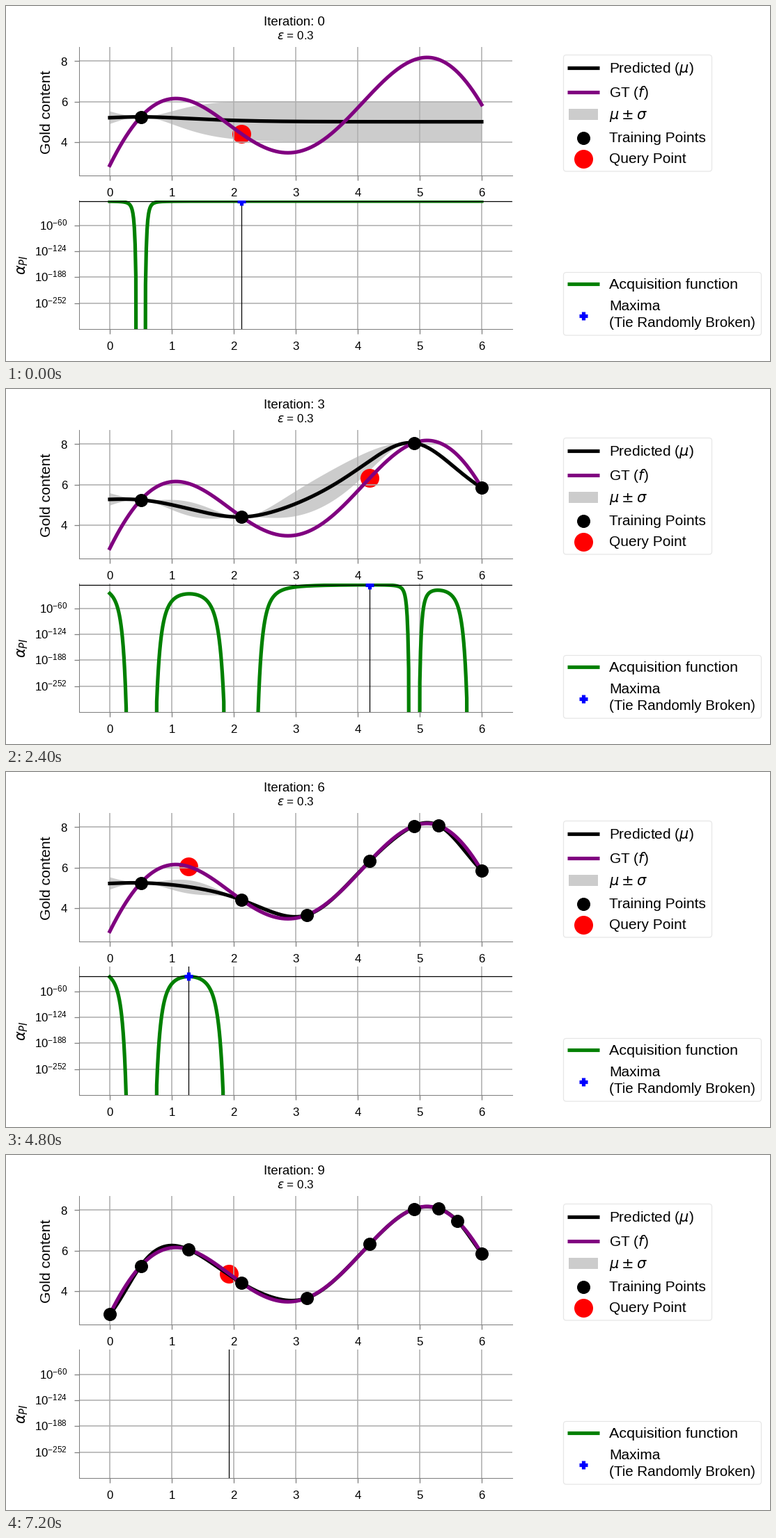
Write a matplotlib script that moves like this. It is 1097 px wide and 511 px high and loops after 8 s.

```python
import math

import numpy as np
import matplotlib.pyplot as plt
from matplotlib.animation import FuncAnimation
from matplotlib.patches import FancyBboxPatch, Rectangle

W, H, DPI = 1097, 511, 100
PX = 72 / DPI  # points per pixel
EPSILON = 0.3
PRIOR_MEAN = 5
UNDERFLOW = -1000  # log10 stand-in for a probability of zero

plt.rcParams.update({"font.family": "Liberation Sans", "mathtext.fontset": "dejavusans"})

grid = np.linspace(0, 6, 500)
query_x = grid[[177, 499, 408, 349, 264, 441, 106, 0, 466, 160]]
train_x = np.concatenate([[0.5], query_x])
erfc = np.vectorize(math.erfc)


def gold(x):
    u = x - 3
    return 2 * u * np.sin(u) + x / 2 + 2


def matern(a, b):
    d = math.sqrt(5) * np.abs(a[:, None] - b[None, :])
    return (1 + d + d**2 / 3) * np.exp(-d)


def predict(x):
    """Posterior mean and spread of the Gaussian process on the grid."""
    cross = matern(x, grid)
    weights = np.linalg.solve(matern(x, x) + 1e-10 * np.eye(len(x)), cross)
    mean = PRIOR_MEAN + (gold(x) - PRIOR_MEAN) @ weights
    spread = np.maximum(1 - np.sum(cross * weights, axis=0), 1e-10)
    return mean, spread


def log_improvement(mean, spread, best):
    z = (mean - best - EPSILON) / spread
    p = 0.5 * erfc(-z / math.sqrt(2))
    return np.where(p > 0, np.log10(np.maximum(p, 5e-324)), UNDERFLOW)


fig = plt.figure(figsize=(W / DPI, H / DPI), dpi=DPI, facecolor="white")


def label(x, y, text, size=20.9, **kw):
    kw = {"va": "baseline", **kw}
    return fig.text(x / W, 1 - y / H, text, fontsize=size * PX, **kw)


def panel(top, bottom, ylim, yticks):
    left, right = 104.5, 727.5
    ax = fig.add_axes([left / W, 1 - bottom / H, (right - left) / W, (bottom - top) / H])
    ax.set(xlim=(-0.5, 6.5), ylim=ylim, xticks=range(7), yticks=yticks)
    ax.set_facecolor("none")
    ax.grid(color="#b0b0b0", lw=1.6 * PX)
    ax.tick_params(length=7 * PX, width=1.3 * PX, color="gray",
                   labelbottom=False, labelleft=False)
    ax.spines[["top", "right"]].set_visible(False)
    ax.spines[["left", "bottom"]].set(color="gray", linewidth=1.05 * PX)
    for k in range(7):
        label(149 + 89 * k, bottom + 30, str(k), 16.7, ha="center")
    for v in yticks:
        y = bottom - (v - ylim[0]) / (ylim[1] - ylim[0]) * (bottom - top)
        text = str(v) if v > 0 else rf"$\mathdefault{{10^{{{v}}}}}$"
        label(88, y + 6.3, text, 16.7, ha="right")
    return ax


top_ax = panel(59.5, 244, (gold(0) - 0.5, gold(grid).max() + 0.5), [4, 6, 8])
low_ax = panel(280, 464.5, (-314.8, 1), [-60, -124, -188, -252])

title = label(413.5, 27.5, "", 18.7, ha="center")
label(415.5, 48, r"$\epsilon$ = 0.3", 17, ha="center")
label(59, 152.5, "Gold content", 21.3, rotation=90, ha="center", va="center")
label(24, 373, r"$\alpha_{PI}$", rotation=90, ha="center", va="center")

THICK, THIN = 5.2 * PX, 1.25 * PX
DOT = dict(marker="o", ls="", color="black", ms=19 * PX, mew=0, zorder=10)
BIG_DOT = dict(marker="o", ls="", color="red", ms=27 * PX, mew=0, zorder=1)
PLUS = dict(marker="+", ls="", color="blue", ms=12.8 * PX, mew=THICK, zorder=10)

band, = top_ax.fill([0], [0], color="#cccccc", lw=0, zorder=0.9)
query_dot, = top_ax.plot([], [], **BIG_DOT)
mean_line, = top_ax.plot([], [], color="black", lw=THICK)
top_ax.plot(grid, gold(grid), color="purple", lw=THICK)
train_dots, = top_ax.plot([], [], **DOT)

acq_line, = low_ax.plot([], [], color="green", lw=THICK)
peak_h = low_ax.axhline(0, color="black", lw=THIN, zorder=3)
peak_v = low_ax.axvline(0, color="black", lw=THIN, zorder=3)
peak_mark, = low_ax.plot([], [], **PLUS)

# Legends, laid out in pixels
key = fig.add_axes([0, 0, 1, 1])
key.set(xlim=(0, W), ylim=(H, 0))
key.axis("off")


def frame_box(x0, y0, x1, y1):
    key.add_patch(FancyBboxPatch((x0, y0), x1 - x0, y1 - y0, fc="white", ec="#e6e6e6",
                                 lw=1.2 * PX, boxstyle="round,pad=0,rounding_size=4"))


def line_key(y, color):
    key.plot([806, 852], [y, y], color=color, lw=THICK, solid_capstyle="butt")


frame_box(800.5, 70.5, 1013.5, 238)
line_key(89.5, "black")
line_key(124, "purple")
key.add_patch(Rectangle((808, 148.5), 42, 15.5, color="#cccccc", lw=0))
key.plot(828.5, 190, **DOT)
key.plot(828.5, 220.5, **BIG_DOT)
for y, text in [(96.5, r"Predicted ($\mu$)"), (131, "GT ($f$)"), (163, r"$\mu \pm \sigma$"),
                (196, "Training Points"), (226, "Query Point")]:
    label(866, y, text)

frame_box(800.5, 383.5, 1084.5, 474)
line_key(400.5, "green")
key.plot(828.5, 446.5, **PLUS)
label(866, 407, "Acquisition function", 21.5)
label(866, 438, "Maxima")
label(866, 461.5, "(Tie Randomly Broken)", 20.5)


def update(i):
    x, q = train_x[:i + 1], query_x[i]
    mean, spread = predict(x)
    acq = log_improvement(mean, spread, gold(x).max())
    peak = acq.max()

    title.set_text(f"Iteration: {i}")
    mean_line.set_data(grid, mean)
    band.set_xy(np.column_stack([np.concatenate([grid, grid[::-1]]),
                                 np.concatenate([mean + spread, (mean - spread)[::-1]])]))
    train_dots.set_data(x, gold(x))
    query_dot.set_data([q], [gold(q)])
    acq_line.set_data(grid, acq)
    peak_h.set_ydata([peak, peak])
    peak_v.set_xdata([q, q])
    peak_mark.set_data([q], [peak])
    return []


anim = FuncAnimation(fig, update, frames=len(query_x), interval=800,
                     repeat=True, repeat_delay=0, init_func=lambda: update(0))
plt.show()
```
